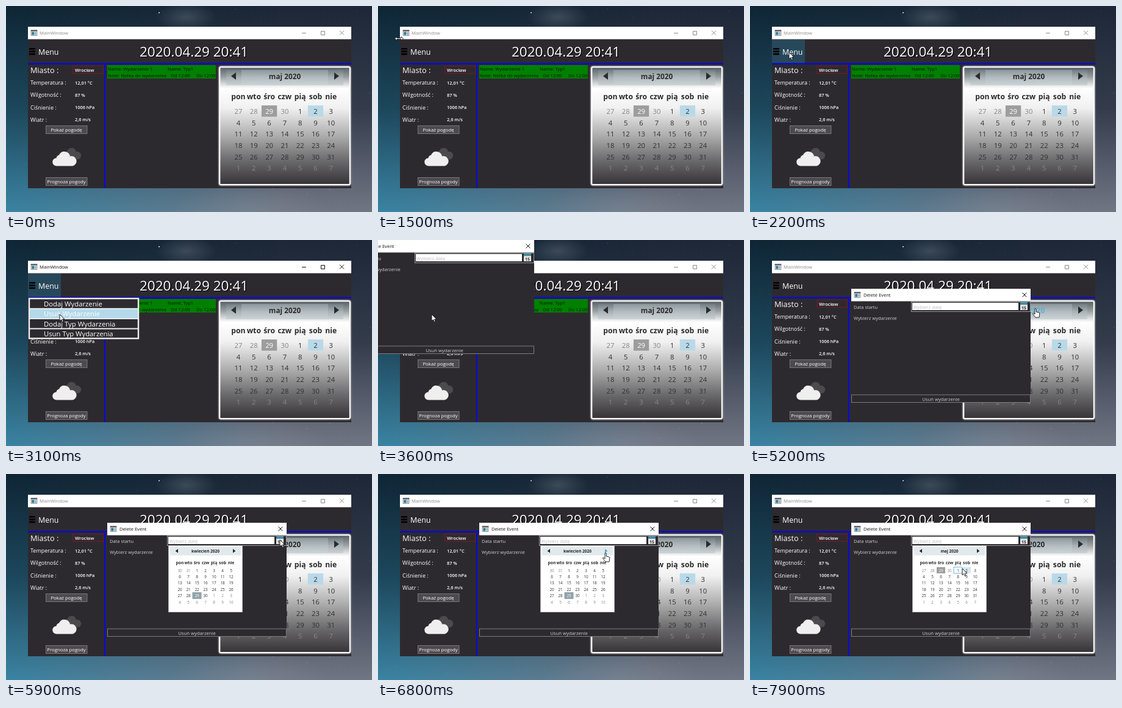
Recreate the animation shown at these times as an HTML page. Size 600 px wide and 338 px high, loop 8 s.

```html
<!DOCTYPE html>
<html lang="pl">
<head>
<meta charset="utf-8">
<style>
html, body { margin: 0; width: 100%; height: 100%; overflow: hidden; background: #1b3040; }
svg { display: block; width: 600px; height: 338px; font-family: "Open Sans", "Noto Sans", sans-serif; font-weight: 500; white-space: pre; }
</style>
</head>
<body>
<svg viewBox="0 0 600 338">
  <defs>
    <linearGradient id="sky" x2="0" y2="1">
      <stop offset="0" stop-color="#0f2635"/><stop offset=".5" stop-color="#1c485d"/><stop offset="1" stop-color="#3a84a3"/>
    </linearGradient>
    <linearGradient id="dusk" x2="0" y2="1">
      <stop offset="0" stop-color="#1d2737"/><stop offset=".5" stop-color="#343c4c"/><stop offset="1" stop-color="#717684"/>
    </linearGradient>
    <linearGradient id="across">
      <stop offset="0" stop-color="#000"/><stop offset=".75" stop-color="#fff"/>
    </linearGradient>
    <mask id="right"><rect width="600" height="338" fill="url(#across)"/></mask>
    <radialGradient id="haze">
      <stop offset="0" stop-color="#8b96a2" stop-opacity=".3"/><stop offset="1" stop-color="#8b96a2" stop-opacity="0"/>
    </radialGradient>
    <linearGradient id="fade" x2="0" y2="1">
      <stop offset="0" stop-color="#566063"/><stop offset=".08" stop-color="#959c9e"/><stop offset=".18" stop-color="#fff"/>
      <stop offset=".35" stop-color="#f0f0f0"/><stop offset=".6" stop-color="#a8a8a8"/><stop offset=".8" stop-color="#69686a"/><stop offset="1" stop-color="#353337"/>
    </linearGradient>
    <linearGradient id="bar" x2="0" y2="1">
      <stop offset="0" stop-color="#727d82"/><stop offset=".5" stop-color="#a9b2b6"/><stop offset="1" stop-color="#cbd2d5"/>
    </linearGradient>
    <filter id="glow" x="-10%" y="-10%" width="120%" height="120%"><feGaussianBlur stdDeviation=".8"/></filter>
  </defs>
  <g id="desktop"></g>
  <g id="stage"></g>
</svg>
<script>
const LOOP = 8000, STEP = 100, DARK = '#2d2a2f';
const MENU_OPEN = 2400, DIALOG_OPEN = 3400, DRAG_START = 4300, DRAG_END = 4900, POPUP_OPEN = 5700, NEXT_MONTH = 7100;
const desktop = document.getElementById('desktop'), stage = document.getElementById('stage');

// time, x, y of the pointer
const track = [
  [1200, 27, 50], [1500, 34.5, 53.5], [1700, 42, 60], [2200, 64, 76], [2500, 64, 76], [3000, 88, 122],
  [3600, 88, 122], [3900, 112, 40], [4200, 112, 40], [4300, 148, 6], [4900, 352, 86], [5200, 468, 112],
  [5400, 449, 108], [5900, 449, 108], [6500, 373, 129], [7200, 373, 129], [7700, 342, 154], [7900, 348, 155]
];

const rect = (x, y, w, h, fill, more = '') => `<rect x="${x}" y="${y}" width="${w}" height="${h}" fill="${fill}" ${more}/>`;
const path = (d, fill, more = '') => `<path d="${d}" fill="${fill}" ${more}/>`;
const line = (d, color, width = 1) => path(d, 'none', `stroke="${color}" stroke-width="${width}"`);
const text = (x, y, size, str, fill = '#fff', more = '') => `<text x="${x}" y="${y}" font-size="${size}" fill="${fill}" ${more}>${str}</text>`;
const mid = 'text-anchor="middle"', bold = mid + ' font-weight="700"';
const at = (x, y, body) => `<g transform="translate(${x} ${y})">${body}</g>`;
const cross = (x, y, color) => line(`M${x} ${y}l7 7m0 -7l-7 7`, color);

function pointer(t) {
  const i = track.findIndex(k => k[0] > t);
  if (i < 0) return track[track.length - 1].slice(1);
  const [a, b] = [track[i - 1], track[i]], f = (t - a[0]) / (b[0] - a[0]);
  return [a[1] + (b[1] - a[1]) * f, a[2] + (b[2] - a[2]) * f];
}

const outline = 'stroke="#111" stroke-width=".9" stroke-linejoin="round"';
const cursors = {
  arrow: path('M0 0V11L2.6 8.6L4.4 12.6L6.2 11.8L4.5 8H8Z', '#fff', outline),
  hand: path('M-1 1Q0 -.5 1.2 1V6L5.5 7Q7 7.3 6.8 9L6 15H0L-4 10Q-5 8 -3.4 8L-1 10Z', '#fff', outline),
  resize: path('M-7 0L-3.5 -3V-1H3.5V-3L7 0L3.5 3V1H-3.5V3Z', '#fff', outline)
};

function windowIcon(x, y) {
  return rect(x, y, 10, 9, '#e8eef2', 'stroke="#777" stroke-width=".7"') + rect(x, y, 10, 2, '#556') +
    rect(x + 1.3, y + 3, 4, 5, '#2a7d95') + rect(x + 6, y + 3, 3, 5, '#a8b6bd');
}

// Six weeks of days; marks maps a cell index to [fill, text colour, stroke]
function days({x, y, dx, dy, size, headY, headSize, first, prevLen, len, marks}) {
  const lead = prevLen - first + 1;
  let out = ['pon', 'wto', 'śro', 'czw', 'pią', 'sob', 'nie']
    .map((d, i) => text(x + i * dx, headY, headSize, d, '#2b2b2b', bold)).join('');
  for (let i = 0; i < 42; i++) {
    const cx = x + i % 7 * dx, base = y + Math.floor(i / 7) * dy, n = i - lead + 1;
    const inside = n > 0 && n <= len, mark = marks[i];
    if (mark) out += rect(cx - dx / 2, base - size * .4 - dy / 2, dx, dy - .2, mark[0], `stroke="${mark[2] || 'none'}"`);
    out += text(cx, base, size, n < 1 ? n + prevLen : inside ? n : n - len, mark ? mark[1] : inside ? '#303030' : '#868686', mid);
  }
  return out;
}

const today = ['#9d9d9d', '#fff'], picked = ['#b9d9e8', '#303030'];
const april = {first: 30, prevLen: 31, len: 30}, may = {first: 27, prevLen: 30, len: 31};

function mainCalendar(hover) {
  return rect(350.3, 100.3, 213.5, 192.8, 'none', 'rx="2" stroke="#fff" stroke-width="3" filter="url(#glow)"') +
    rect(350.3, 100.3, 213.5, 192.8, 'url(#fade)', 'rx="2" stroke="#fff" stroke-width="2"') +
    rect(361, 105, 192, 25, 'url(#bar)') + rect(386, 105, 142, 25, '#c9d3d8', 'opacity=".3"') +
    path('M377 109v12l-8 -6zM538 109v12l8 -6z', '#2b2b2b') +
    text(457, 120, 11.8, 'maj 2020', hover ? '#5cb0d6' : '#2b2b2b', bold) +
    days({x: 381, y: 177, dx: 25.3, dy: 18.65, size: 11.3, headY: 153, headSize: 12.2, ...may, marks: {2: today, 5: picked}});
}

function weather() {
  const rows = [['Temperatura :', '12,01 °C'], ['Wilgotność :', '87 %'], ['Ciśnienie :', '1006 hPa'], ['Wiatr :', '2,6 m/s']];
  const button = (y, label) => rect(65.5, y, 67.5, 13, '#4d4a4f', 'stroke="#858585" stroke-width=".8"') + text(99, y + 9.5, 7.8, label, '#fff', mid);
  const cloud = fill => path('M7 27.5a6.5 6.5 0 0 1 -.5 -13a6 6 0 0 1 4.5 -5a9.5 9.5 0 0 1 18 2a8 8 0 0 1 4.5 16z', fill);
  return text(40, 110, 12.6, 'Miasto :') + rect(109.5, 98.5, 50, 12, 'none', 'stroke="#86171b" stroke-width=".8"') +
    text(113, 108, 7.6, 'Wrocław', '#fff', 'font-weight="600"') +
    rows.map(([k, v], i) => text(40, 129 + i * 20.3, 9, k) + text(113, 128.5 + i * 20.3, 7.4, v, '#fff', 'font-weight="600"')).join('') +
    button(196.5, 'Pokaż pogodę') + button(281.5, 'Prognoza pogody') +
    at(92, 230, `<g transform="scale(.79)">${cloud('#4c4a4d')}</g>`) + at(76, 235, cloud('#efefef'));
}

function mainWindow(active, menuHover, headerHover) {
  const ink = active ? '#111' : '#8b8b8b', date = '2020.04.29 20:41';
  return rect(36, 34, 530, 265, DARK) + rect(36, 34, 530, 20.5, '#fff') +
    windowIcon(41, 39.5) + text(55, 47, 7.7, 'MainWindow', ink) +
    line('M485 44.5h7M516.5 41.5h6v6h-6z', ink) + cross(547, 40.5, ink) +
    (menuHover ? rect(36, 55, 54, 40, '#27485a') : '') +
    path('M38 69h10v2.6h-10zM38 73.3h10v2.6h-10zM38 77.6h10v2.6h-10z', '#000') + text(53, 80, 12.4, 'Menu') +
    text(220.3, 84.3, 22.5, date, '#000') + text(219, 83, 22.5, date) +
    line('M36 94.8h530M162 95v204', '#0b0bd0', 2.4) + weather() +
    rect(166, 97, 178, 22, '#008000') +
    [[167, 106, 'Name: Wydarzenie 1'], [265, 106, 'Name: Typ1'], [167, 117, 'Note: Notka do wydarzenia'], [270, 117, 'Od 12:00'], [312, 117, 'Do 12:00']]
      .map(([x, y, s]) => text(x, y, 7.6, s, '#001400')).join('') +
    mainCalendar(headerHover);
}

function menu(y) {
  const hovered = Math.floor((y - 96) / 16.4);
  return rect(38, 96, 179, 65.5, DARK, 'stroke="#eee" stroke-width="2.4"') +
    ['Dodaj Wydarzenie', 'Usuń Wydarzenie', 'Dodaj Typ Wydarzenia', 'Usun Typ Wydarzenia'].map((label, i) => {
      const top = 96.3 + i * 16.4;
      return (i === hovered ? rect(39, top, 177, 16.4, '#b3d9ea') : '') +
        (i ? line(`M38 ${top}h179`, '#eee', 1.8) : '') + text(62, top + 12.4, 11.3, label);
    }).join('');
}

function dialog() {
  return rect(0, 0, 294, 187, DARK) + rect(0, 0, 294, 20.5, '#fff') +
    windowIcon(5, 5.5) + text(20, 13, 7.6, 'Delete Event', '#111') + cross(280.5, 6.5, '#111') +
    text(4, 33, 7.5, 'Data startu', '#d0d0d0') + text(4, 51, 7.6, 'Wybierz wydarzenie', '#d0d0d0') +
    rect(98.5, 21.5, 195, 16, DARK, 'stroke="#a5a5a5" stroke-width=".9"') +
    rect(100, 23, 174, 12, '#fff') + text(101, 32.5, 7.8, 'Wybierz datę', '#bdbdbd') +
    rect(277, 22.5, 12, 12.5, '#e6e6e6') + rect(277, 22.5, 12, 3.8, '#3d8ba5') + text(283, 33.5, 6.8, '15', '#333', bold) +
    rect(.5, 174, 293, 12.5, DARK, 'stroke="#858585" stroke-width=".9"') + text(147, 183.5, 7.7, 'Usuń wydarzenie', '#d0d0d0', mid);
}

function popup(t, x) {
  const next = t >= NEXT_MONTH, onArrow = t >= 6500 && t <= 7200;
  const marks = next ? {2: today} : {30: [...today, '#6fb1d0']};
  if (next && t >= 7500) marks[4] = ['#fff', '#303030', '#62b4dc'];
  if (next && x >= 347) marks[5] = ['#d3e8f2', '#303030'];
  return rect(266.5, 117.5, 121, 109, '#fff', 'stroke="#b5bcc0" stroke-width=".8"') + rect(269, 119.5, 116, 14, '#e2e9ed') +
    path('M282 123v6.4l-4.4 -3.2z', '#222') + path('M372 123v6.4l4.4 -3.2z', onArrow ? '#4ba9d4' : '#222') +
    text(327, 129, 6.6, next ? 'maj 2020' : 'kwiecień 2020', '#222', bold) +
    days({x: 285, y: 160.5, dx: 14, dy: 10.4, size: 6.3, headY: 148, headSize: 6.8, ...(next ? may : april), marks});
}

function scene(t) {
  const [x, y] = t >= track[0][0] ? pointer(t) : [-50, -50];
  const menuOpen = t >= MENU_OPEN && t < DIALOG_OPEN, onHeader = t >= 5100 && t < 5300;
  const drag = Math.min(1, Math.max(0, (t - DRAG_START) / (DRAG_END - DRAG_START)));
  const shape = t < 1700 ? 'resize' : onHeader || t >= 6500 && t <= 7200 ? 'hand' : 'arrow';
  let out = mainWindow(menuOpen, menuOpen || t >= 2100 && t < MENU_OPEN, onHeader);
  if (menuOpen) out += menu(y);
  if (t >= DIALOG_OPEN) out += at(-38 + 204 * drag, 80 * drag, dialog());
  if (t >= POPUP_OPEN) out += popup(t, x);
  if (t >= DRAG_START && t < DRAG_END) out += at(...pointer(t + 60), cursors.arrow);
  return out + at(x, y, cursors[shape]);
}

function sky() {
  let seed = 7, out = rect(0, 0, 600, 338, 'url(#sky)') + rect(0, 0, 600, 338, 'url(#dusk)', 'mask="url(#right)"') +
    '<ellipse cx="400" cy="335" rx="130" ry="45" fill="url(#haze)"/><ellipse cx="295" cy="18" rx="50" ry="24" fill="url(#haze)"/>' +
    '<circle cx="251" cy="11" r="1" fill="#dce8f0"/>';
  const random = () => (seed = seed * 16807 % 2147483647) / 2147483647;
  for (let i = 0; i < 110; i++)
    out += `<circle cx="${random() * 600}" cy="${random() * 338}" r="${.2 + random() * .5}" fill="#c5d3de" opacity="${random() * .5}"/>`;
  return out;
}

desktop.innerHTML = sky();
let shown = -1;
function frame() {
  const t = Math.floor(performance.now() % LOOP / STEP) * STEP;
  if (t !== shown) stage.innerHTML = scene(shown = t);
  requestAnimationFrame(frame);
}
frame();
</script>
</body>
</html>
```
